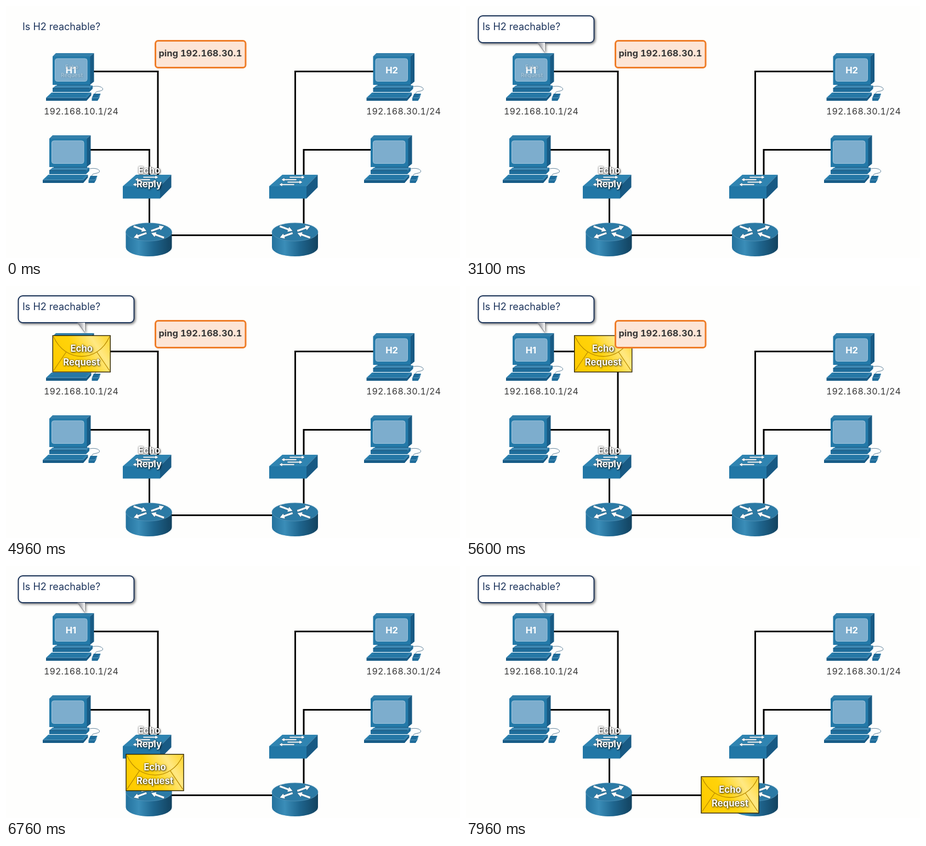
These frames come from a looping animation (828 px wide and 460 px high, 8 s). An HTML page:

```html
<!DOCTYPE html>
<html lang="en">
<head>
<meta charset="utf-8">
<title>Ping between two hosts</title>
<style>
  html, body { margin: 0; width: 100%; height: 100%; overflow: hidden; background: #fefefd; }
  svg { display: block; width: 828px; height: 460px; font-family: Inter, "Open Sans", sans-serif; }
  .wire { fill: none; stroke: #000; stroke-width: 3; }
  .host { font-size: 16.5px; font-weight: 700; fill: #fff; text-anchor: middle; }
  .ip { font-size: 16px; letter-spacing: .15px; fill: #363636; }
  .command { font-size: 16.5px; font-weight: 700; fill: #363636; text-anchor: middle; }
  .digits { font-variant-numeric: tabular-nums; }
  .msg { font-size: 16.7px; font-weight: 700; fill: #fff; text-anchor: middle;
    filter: drop-shadow(0 0 1px rgba(0,0,0,.55)) drop-shadow(1px 1px 1.5px rgba(0,0,0,.65)); }
  .arrow { fill: #fff; stroke: #174e70; stroke-width: .5; }
</style>
</head>
<body>
<svg viewBox="0 0 828 460">
  <defs>
    <linearGradient id="gold" x1="0" y1=".7" x2="1" y2=".3">
      <stop offset="0" stop-color="#ffcb00"/>
      <stop offset=".45" stop-color="#ffd30a"/>
      <stop offset=".8" stop-color="#ffe883"/>
      <stop offset="1" stop-color="#ffdb45"/>
    </linearGradient>
    <linearGradient id="drum">
      <stop offset="0" stop-color="#23719d"/>
      <stop offset=".28" stop-color="#3a8db8"/>
      <stop offset=".6" stop-color="#1f668f"/>
      <stop offset="1" stop-color="#12425f"/>
    </linearGradient>
    <linearGradient id="tail">
      <stop offset="0" stop-color="#85868c"/>
      <stop offset=".6" stop-color="#c4c4c8"/>
      <stop offset="1" stop-color="#fff"/>
    </linearGradient>

    <g id="pc">
      <path d="M153 149C164 144 177 147 176.500 152S160 154 163 161" fill="none" stroke="#5b7f98"/>
      <path d="M97 137H150L155 146H92Z" fill="#17567e"/>
      <path d="M85 150L91 145H158L152 150Z" fill="#3d88b3"/>
      <path d="M85 150H152L158 145V151L152 157H85Z" fill="#1f6d9b"/>
      <path d="M85 150H152" stroke="#164f74"/>
      <path d="M85 92L91 86H160.500L153 92Z" fill="#3480ab"/>
      <path d="M153 92L160.500 86V138L153 144Z" fill="#185a84"/>
      <rect x="85" y="92" width="68.500" height="52" fill="#2379a8"/>
      <rect x="89.500" y="96" width="58.500" height="41.500" rx="4" fill="#7dadcd" stroke="#9cc2da"/>
      <path d="M83 158H155.500L147 167.500H73Z" fill="#2a7fae"/>
      <path d="M73 167.500H147L155.500 158V163L147 173H73Z" fill="#185c87"/>
      <path d="M86 160.500H149M81 164H146" stroke="#1a6491"/>
      <path d="M160 160H172.500L170 168L167 173H156.500V168Z" fill="#1f6c9a"/>
      <path d="M157 167.500H168L172 161" fill="none" stroke="#6aa5c6" stroke-width=".8"/>
    </g>

    <g id="switch">
      <path d="M213 329L237 308H301.500L281 329Z" fill="#2f84b1"/>
      <path d="M281 329L301.500 308V331L281 351.500Z" fill="#185a84"/>
      <path d="M213 329H281V351.500H213Z" fill="#2277a6"/>
      <g id="switchArrows"></g>
    </g>

    <g id="router">
      <path d="M218.500 412.500V440.500A42 16.500 0 0 0 302.500 440.500V412.500Z" fill="url(#drum)"/>
      <ellipse cx="260.500" cy="412.500" rx="42" ry="16.500" fill="#2b7aa5" stroke="#5795b8" stroke-width=".8"/>
      <g id="routerArrows"></g>
    </g>
  </defs>

  <rect width="828" height="460" fill="#fefefd"/>
  <path class="wire" d="M158 119.500H277V312M150 262.500H261.500V400M672 119.500H527.500V312
    M668 262.500H543V400M300 418.500H488"/>

  <use href="#switch"/>
  <use href="#switch" x="267"/>
  <use href="#router"/>
  <use href="#router" x="266.500"/>
  <use href="#pc"/>
  <use href="#pc" x="-6" y="150"/>
  <use href="#pc" x="584.500"/>
  <use href="#pc" x="580" y="150"/>

  <text class="host" x="118.500" y="122.800">H1</text>
  <text class="host" x="703.500" y="122.800">H2</text>
  <text class="ip" x="69" y="198">192.168.10.1/24</text>
  <text class="ip" x="657" y="198">192.168.30.1/24</text>

  <g id="bubble">
    <g style="filter: drop-shadow(2px 2px 2px rgba(0,0,0,.5))">
      <rect x="22.500" y="18" width="211" height="49" rx="8" fill="#fff" stroke="#1b3358" stroke-width="2"/>
      <path d="M130.500 67L144 85V67Z" fill="url(#tail)"/>
    </g>
    <path d="M130.500 67L144 85" stroke="#777a82"/>
  </g>
  <text x="30" y="44" font-size="18" fill="#1d345c">Is H2 reachable?</text>

  <!-- Drawn around its own centre -->
  <g id="letter">
    <g id="paper">
      <rect x="-52.500" y="-33" width="105" height="66.500" fill="url(#gold)" stroke="#2b2200" stroke-width="1.400"/>
      <path d="M-51 -31C-30 17 30 17 51 -31M-28 -3L-51 31M28 -3L51 31" fill="none" stroke="#b98b00" stroke-width="1.300"/>
    </g>
    <g id="request" class="msg">
      <text y="-3.500">Echo</text>
      <text y="21.500">Request</text>
    </g>
  </g>

  <g class="msg">
    <text x="261" y="306">Echo</text>
    <text x="261" y="331">Reply</text>
  </g>

  <g id="ping">
    <rect x="272.500" y="63.500" width="164.500" height="49" rx="5" fill="#fde5d6" stroke="#ef7d28" stroke-width="3"/>
    <text class="command" x="354.500" y="92">ping 192.168.30.1</text>
  </g>
</svg>
<script>
  const $ = id => document.getElementById(id);
  const LOOP = 8000;

  // Equal-width digits, while dots and slashes keep their own width
  for (const label of document.querySelectorAll('.ip, .command'))
    label.innerHTML = label.textContent.replace(/\d+/g, '<tspan class="digits">$&</tspan>');

  // Block arrow from (x1,y1) to (x2,y2)
  function arrow(x1, y1, x2, y2, body, head) {
    const len = Math.hypot(x2 - x1, y2 - y1), neck = len - head * 1.7;
    const turn = Math.atan2(y2 - y1, x2 - x1) * 180 / Math.PI;
    return `<path class="arrow" transform="translate(${x1} ${y1}) rotate(${turn})"
      d="M0 ${-body}H${neck}V${-head}L${len} 0L${neck} ${head}V${body}H0Z"/>`;
  }

  // Four rows pointing right and left in turn
  for (let row = 0; row < 4; row++) {
    const left = row % 2, dir = left ? -1 : 1;
    const x = 264 - 15 * left - 4 * (row >> 1), y = 312.5 + 4.5 * row;
    $('switchArrows').innerHTML += arrow(x - 14 * dir, y, x + 14 * dir, y, 1.3, 3.5);
  }

  // One diagonal points inwards, the other outwards
  for (const sx of [-1, 1]) for (const sy of [-1, 1]) {
    const inner = [260.5 + 4 * sx, 412.5 + 1.8 * sy];
    const outer = [260.5 + 28 * sx, 412.5 + 10.5 * sy];
    const ends = sx === sy ? [...outer, ...inner] : [...inner, ...outer];
    $('routerArrows').innerHTML += arrow(...ends, 2, 5.3);
  }

  const ramp = (t, from, to) => Math.min(1, Math.max(0, (t - from) / (to - from)));
  const glide = (t, from, to) => ramp(t, from, to) ** 1.08;

  function draw(t) {
    const grow = ramp(t, 4230, 4830);
    const x = 120 + 4.5 * grow + 147 * glide(t, 4870, 5715) + 210 * glide(t, 6905, 7960);
    const y = 117 + 6.5 * grow + 294 * glide(t, 5690, 6920);
    $('letter').setAttribute('transform', `translate(${x} ${y}) scale(${.6 + .4 * grow})`);
    $('paper').setAttribute('opacity', grow);
    $('request').setAttribute('opacity', .28 + .72 * grow);
    $('bubble').setAttribute('visibility', t >= 700 ? 'visible' : 'hidden');
    $('ping').setAttribute('opacity', 1 - ramp(t, 5700, 6000));
  }

  const start = performance.now();
  function tick() {
    draw((performance.now() - start) % LOOP);
    requestAnimationFrame(tick);
  }
  draw(0);
  requestAnimationFrame(tick);
</script>
</body>
</html>
```
